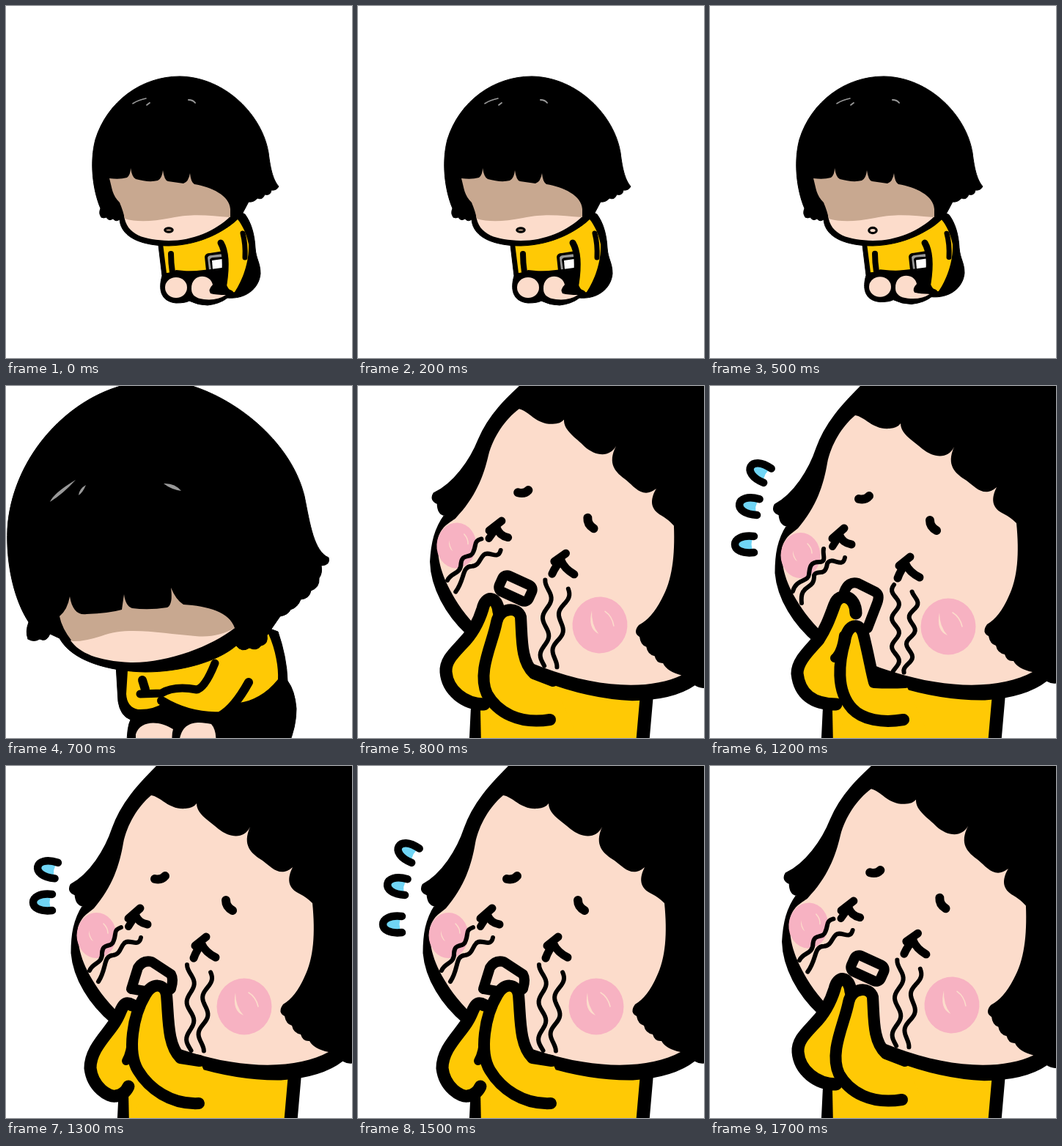
Write an HTML page with a canvas that moves like this. It is 472x480 px and loops after 1.91 s.

```html
<!DOCTYPE html>
<html lang="en">
<head>
<meta charset="utf-8">
<title>Sobbing girl</title>
<style>
html, body { margin: 0; width: 100%; height: 100%; overflow: hidden; background: #fff; }
canvas { display: block; }
</style>
</head>
<body>
<canvas id="stage" width="472" height="480"></canvas>
<script>
const ctx = document.getElementById('stage').getContext('2d');
const BLACK = '#000', SKIN = '#fcdccb', SHADE = '#c8a890', YELLOW = '#ffc905',
      PINK = '#f7b2c2', BLUE = '#70d5f5', GRAY = '#999';
const LOOP = 1910, STEP = 100, LAST = 17;

ctx.lineCap = ctx.lineJoin = 'round';

function fill(d, color = BLACK) {
  ctx.fillStyle = color;
  ctx.fill(new Path2D(d));
}

function line(d, width, color = BLACK) {
  ctx.lineWidth = width;
  ctx.strokeStyle = color;
  ctx.stroke(new Path2D(d));
}

function shape(d, color, width) {
  fill(d, color);
  line(d, width);
}

function ellipse(x, y, rx, ry, color, width = 0) {
  ctx.beginPath();
  ctx.ellipse(x, y, rx, ry, 0, 0, Math.PI * 2);
  ctx.fillStyle = color;
  ctx.fill();
  if (width) {
    ctx.lineWidth = width;
    ctx.strokeStyle = BLACK;
    ctx.stroke();
  }
}

function placed(x, y, angle, scale, draw) {
  ctx.save();
  ctx.translate(x, y);
  ctx.rotate(angle);
  ctx.scale(scale, scale);
  draw();
  ctx.restore();
}

// Far view: sitting and muttering, the body breathing with the mouth.
function sitting(open) {
  ctx.save();
  ctx.translate(0, 320);
  ctx.scale(1, open ? 0.983 : 1);
  ctx.translate(0, -320);
  shape('M207 318L213 368C208 385 210 403 232 405Q245 405 250 402Q262 408 275 408Q292 406 302 398C325 400 345 387 347 365C347 350 341 345 340 330C339 310 334 295 326 284L318 280L210 310Z', BLACK, 1);
  fill('M214 324L219 364Q225 364 232 360Q265 364 301 358L300 378Q305 392 312 390C322 375 332 350 331 325C328 310 322 298 316 291C290 316 250 326 214 324Z', YELLOW);
  fill('M273 361L271 342Q272 337 278 337L297 334V361Z');
  fill('M277 360L275 343Q276 340 280 340L296 338V360Z', GRAY);
  fill('M280 360L278 346Q279 343 283 343L296 342V360Z');
  fill('M282 360L281 347L295 345V360Z', '#fff');
  line('M225 338Q225 350 227 363', 8);
  line('M293 323Q303 340 297 379', 9);
  line('M323 310Q327 325 326 343', 7);
  fill('M219 364Q260 362 302 356L300 376L250 376Z');
  ellipse(232, 384, 15, 14, SKIN);
  fill('M253 386C252 364 279 364 282 380Q275 387 279 392Q287 394 300 394Q288 402 270 400Q253 398 253 386Z', SKIN);
  line('M284 388Q294 386 306 392', 9);
  ctx.restore();

  shape('M130 288Q126 283 129 276C118 250 114 212 122 182C138 130 185 96 237 96C300 97 350 150 358 200C361 225 365 238 372 246Q369 252 362 251Q361 259 353 257Q350 265 343 262Q338 268 331 267L323 282C303 307 265 326 222 327C190 327 157 318 155 291Q150 295 146 290Q140 294 137 288Q133 290 130 288Z', BLACK, 1);
  fill('M161 285Q185 285 220 280Q265 275 306 280V287C285 307 255 320 222 320C190 319 164 313 161 285Z', SKIN);
  fill('M141 235Q155 237 165 234Q170 230 170 221Q172 234 177 236Q195 241 207 238Q213 235 214 224Q216 238 221 239L242 242Q249 240 251 228Q252 240 257 243C280 247 305 258 306 277V288C280 287 260 282 225 289Q185 297 162 290Q160 280 155 268C145 258 145 250 141 235Z', SHADE);
  ellipse(222, open ? 306 : 305.5, 5.2, open ? 3.6 : 2.6, open ? SKIN : SHADE, 3.2);
  line('M173 133Q181 128 191 126', 1.6, GRAY);
  line('M192 135L196 132', 1.8, GRAY);
  line('M249 128Q255 128 258 132', 2, GRAY);
}

// Middle view: hunched over, arms folded.
function hunched() {
  shape('M150 380L153 430Q156 450 170 455Q165 465 165 490H385Q396 465 396 440Q394 415 384 402Q383 370 371 335L330 320Z', BLACK, 1);
  fill('M166 388C220 388 280 375 315 345Q335 355 358 338C368 360 372 385 371 400C355 420 335 430 318 432L297 446Q260 450 215 432Q200 442 180 441Q165 438 164 420Z', YELLOW);
  line('M285 378Q271 413 260 414C238 410 222 413 212 419L183 420', 11);
  line('M186 401L190 414', 12);
  line('M331 404Q311 440 292 450Q250 452 212 429', 12);
  fill('M177 490V475C183 455 210 456 228 468Q225 478 228 490Z', SKIN);
  fill('M236 490C237 455 262 457 280 461Q288 470 286 490Z', SKIN);

  shape('M30 345Q26 335 31 322C10 290 0 240 2 195C8 100 80 20 160 -1H251C320 20 390 80 407 150C415 190 420 225 440 234Q443 244 430 245Q432 255 427 262Q428 275 416 279Q414 290 402 291Q398 302 388 305Q385 312 374 314L356 340Q358 352 348 354Q342 362 332 357Q322 364 314 354C290 375 240 390 190 390C140 389 90 375 73 344L60 338Q55 350 46 345Q38 350 30 345Z', BLACK, 1);
  fill('M88 347C130 335 150 322 180 325C230 328 270 335 312 330C280 355 220 378 170 377C125 375 100 364 88 347Z', SKIN);
  fill('M73 314Q84 305 87 287C90 305 98 313 110 311Q140 310 158 305L161 284Q163 300 172 303Q195 306 220 302Q228 298 225 275Q232 292 242 298C275 300 305 308 312 330C295 339 280 343 258 341C215 338 165 327 130 341Q105 349 90 348Q76 330 73 314Z', SHADE);
  fill('M60 158Q65 146 95 128Q78 147 60 158Z', GRAY);
  fill('M99 149Q100 140 109 135Q105 145 99 149Z', GRAY);
  fill('M215 133Q230 132 239 143Q225 141 215 133Z', GRAY);
}

// A wavering line that swings to both sides of a straight one.
function wave(x0, y0, x1, y1, turns, phase) {
  const dx = x1 - x0, dy = y1 - y0, length = Math.hypot(dx, dy), steps = 40;
  let d = '';
  for (let i = 0; i <= steps; i++) {
    const u = i / steps, swing = 5 * Math.sin(phase + turns * u * Math.PI * 2) / length;
    d += `${i ? 'L' : 'M'}${x0 + dx * u + dy * swing} ${y0 + dy * u - dx * swing}`;
  }
  line(d, 6);
}

// Close view: crying with the hands near the mouth.
function cryingHead(pose) {
  shape('M235 -40L207 0C190 18 160 45 146 85C136 115 115 148 89 162Q84 171 95 175Q96 190 106 190C93 210 90 230 90 255C93 290 115 325 145 350C200 400 300 428 375 427C420 424 445 412 459 401Q466 405 472 404H530V-60Z', BLACK, 3);
  fill('M198 40C212 42 222 60 245 58Q256 57 260 51C260 66 278 75 290 86C305 98 325 100 333 83C322 108 334 119 350 129C362 138 374 153 391 138C381 158 388 168 400 174Q410 179 418 187C422 228 420 262 407 288Q395 315 378 325Q370 336 380 341Q382 352 390 354Q392 364 402 366Q405 376 414 375Q420 386 440 390C400 412 330 415 250 390C200 375 160 350 130 310C105 275 97 250 98 222C102 205 112 201 120 194C145 165 155 135 160 105C165 80 180 55 198 40Z', SKIN);

  ellipse(123.5, 231, 27, 31, PINK);
  ellipse(325, 328, 37.5, 38.5, PINK);
  fill('M113 224Q112 235 119 239Q114 232 113 224Z', SKIN);
  fill('M313 309Q308 334 324 340Q313 328 313 309Z', SKIN);
  line('M331 309Q341 315 344 328', 1.5, SKIN);
  line('M133 215Q139 221 139 228', 1.5, SKIN);

  line('M203 154Q212 156 217 150', 12);
  line('M300 183Q300 192 309 197', 12);
  line('M183 194L167 208', 11);
  line('M176 205L167 219', 10);
  line('M177 204Q181 214 193 216', 11);
  line('M273 233L258 245', 11);
  line('M267 243Q260 251 256 262', 11);
  line('M267 243Q272 254 286 261', 11);

  if (pose === 'low') {
    line('M155 222C153 230 160 240 149 240C136 240 136 248 135 257C134 268 118 262 113 280', 6);
    line('M184 234C181 250 166 231 160 242C157 262 146 249 142 258C143 280 122 268 125 296', 6);
    wave(253, 271, 253, 391, 3.1, -2.73);
    wave(280, 281, 269, 391, 3, -1.08);
  } else {
    line('M157 220C146 224 151 228 147 238C144 249 132 240 131 255C132 270 118 268 114 279', 6);
    line('M184 234C181 249 168 234 161 242C156 247 156 257 146 258C132 259 138 276 126 294', 6);
    wave(252, 271, 251, 388, 2.3, -1.57);
    wave(277, 281, 265, 388, 2.15, 0.44);
  }
}

const ARMS = {
  low: {
    back: 'M199 310C199 286 177 280 170 298C162 320 158 330 148 346C136 360 119 375 119 392C122 420 140 434 172 434',
    front: 'M264 455C235 460 208 455 194 440C171 415 176 375 184 348C187 323 205 322 209 338C216 365 220 390 224 404Q245 405 266 404',
    thumb: 'M170 371Q179 363 182 340'
  },
  high: {
    back: 'M172 326C158 318 158 335 150 347C140 365 115 385 115 412C118 438 140 452 150 450Q162 448 167 437',
    front: 'M263 460C225 462 195 440 180 415C165 390 173 340 190 312C200 295 216 296 219 312C222 345 220 380 238 398L264 402',
    thumb: 'M164 402Q170 392 172 370'
  },
  rest: {
    back: 'M192 308C190 286 174 285 170 304C162 330 150 344 142 352C130 365 119 375 120 390C122 415 145 434 172 434',
    front: 'M262 455C220 462 190 445 176 420C162 390 184 350 189 322C193 302 218 300 222 315C224 345 222 375 240 392L266 402',
    thumb: ''
  }
};

function drop(x, y, angle) {
  placed(x, y, angle, 1, () => {
    const rim = 'M13 -11C-4 -13 -13 -7 -13 0C-13 7 -4 13 13 11';
    fill(rim + 'Q6 0 13 -11Z', BLUE);
    line(rim, 10.5);
  });
}

const NEAR_DROPS = [[56, 140, 0.2], [50, 186, 0]];
const FAR_DROPS = [[67, 116, 0.5], [53, 163, 0.16], [47, 216, 0]];

function crying(pose, drops) {
  const arms = ARMS[pose], rest = pose === 'rest';
  shape('M163 438L160 500H387L394 420L280 395Z', YELLOW, 18);
  if (rest) placed(24.4, -20.2, 0.0577, 1, () => cryingHead(pose));
  else cryingHead(pose);

  if (rest) {
    placed(215, 276, 0.43, 1, () => {
      ctx.beginPath();
      ctx.roundRect(-22, -12, 44, 24, 7);
      ctx.lineWidth = 14;
      ctx.strokeStyle = BLACK;
      ctx.stroke();
    });
  } else if (pose === 'low') {
    line('M183 281Q189 265 202 269L226 281Q232 285 228 296L215 330', 14);
  } else {
    line('M171 304L180 275Q187 264 199 267L225 284Q229 291 225 304L212 311L172 304', 14);
  }

  fill('M166 395H200V490H168Z', YELLOW);
  shape(arms.back, YELLOW, 17);
  fill(arms.front + 'L300 480H172L190 440Z', YELLOW);
  line(arms.front, 16);
  line(arms.thumb, 12);
  drops.forEach(d => drop(...d));
}

function draw(step) {
  ctx.fillStyle = '#fff';
  ctx.fillRect(0, 0, 472, 480);
  if (step < 6) sitting(step % 2 === 1);
  else if (step === 6) placed(-130, -111, 0, 1.46, () => sitting(false));
  else if (step === 7) hunched();
  else if (step === 8 || step === LAST) crying('rest', []);
  else crying(step % 2 ? 'high' : 'low', step % 3 === 1 ? NEAR_DROPS : FAR_DROPS);
}

const start = performance.now();
let shown = -1;

function tick() {
  const time = (performance.now() - start) % LOOP;
  const step = Math.min(LAST, Math.floor(time / STEP));
  if (step !== shown) draw(shown = step);
  requestAnimationFrame(tick);
}
tick();
</script>
</body>
</html>
```
